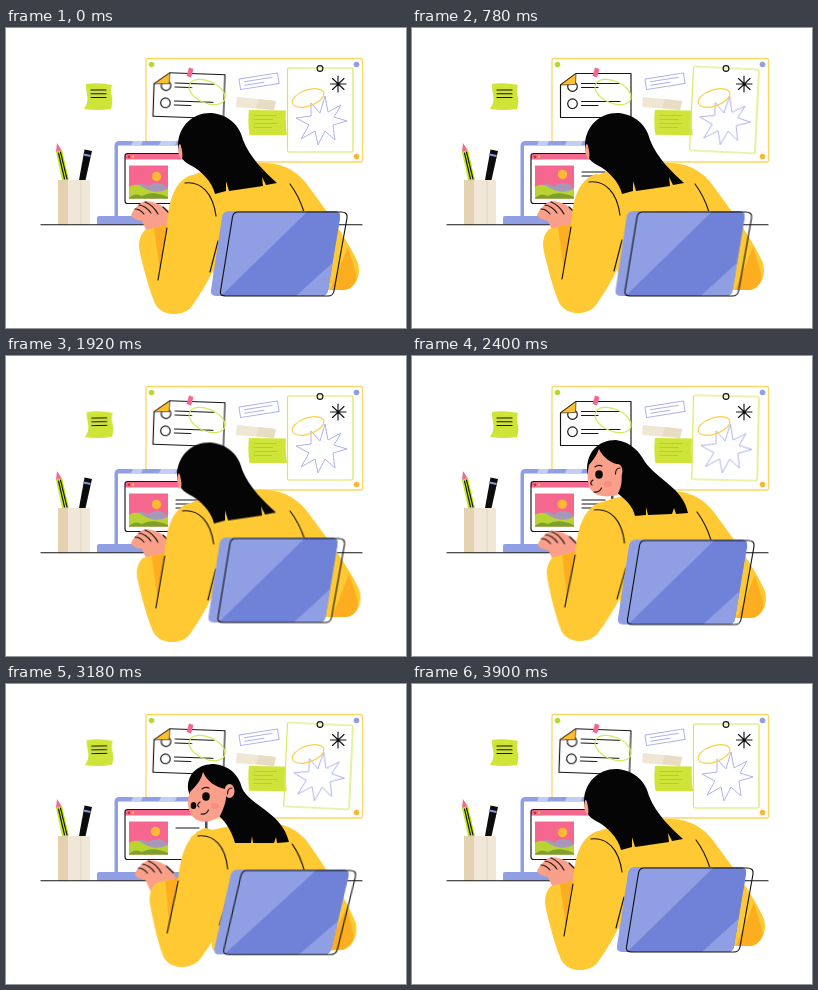
An HTML page for the animation above (3.93 s loop, 400 px wide and 300 px high).

```html
<!DOCTYPE html>
<html lang="en">
<head>
<meta charset="utf-8">
<title>Working at the desk</title>
<style>
html, body { margin: 0; width: 100%; height: 100%; overflow: hidden; background: #fff; }
svg { display: block; width: 400px; height: 300px; }
.ink { fill: none; stroke: #141414; stroke-width: 1.15; stroke-linecap: round; stroke-linejoin: round; }
.lilac { fill: none; stroke: #aeb2ea; stroke-width: 1; stroke-linejoin: round; }
.lime { fill: #cfe438; }
.blue { fill: #909fe4; }
.yellow { fill: #fec933; }
.amber { fill: #fcae20; }
.skin { fill: #fa9f8a; }
.pink { fill: #f5678e; }

.move { animation: 3930ms ease-in-out infinite; }

/* wall */
.note { transform-origin: 92px 56px; animation-name: note; }
@keyframes note { 0%, 20%, 61%, 100% { transform: none; } 34%, 49%, 81% { transform: translateX(.6px) rotate(-1deg); } }
.sheet { transform-origin: 314px 40px; animation-name: sheet; animation-duration: 1965ms; }
@keyframes sheet { 0%, 100% { transform: none; } 50% { transform: rotate(3deg); } }
.page { transform-origin: 184px 45px; animation-name: page; }
@keyframes page { 0%, 49%, 81%, 100% { transform: rotate(2deg); } 20%, 61% { transform: none; } 34% { transform: rotate(2.4deg); } }
.memo { transform-origin: 262px 82px; animation-name: memo; animation-duration: 1965ms; }
@keyframes memo { 0%, 100% { transform: none; } 60% { transform: rotate(.8deg); } }

/* screen */
.row { stroke-dasharray: 24; animation-timing-function: linear; }
.r1 { animation-name: r1; } .r2 { animation-name: r2; } .r3 { animation-name: r3; }
@keyframes r1 { 0%, 4% { stroke-dashoffset: 24.5; } 14%, 83% { stroke-dashoffset: 0; } 92%, 100% { stroke-dashoffset: 24.5; } }
@keyframes r2 { 0%, 14% { stroke-dashoffset: 24.5; } 23%, 72% { stroke-dashoffset: 0; } 79%, 100% { stroke-dashoffset: 24.5; } }
@keyframes r3 { 0%, 23% { stroke-dashoffset: 24.5; } 32%, 65% { stroke-dashoffset: 0; } 72%, 100% { stroke-dashoffset: 24.5; } }
.sun { animation-name: sun; }
@keyframes sun { 0%, 34%, 49%, 100% { transform: none; } 20% { transform: translateY(-2px); } 81% { transform: translate(-1px, -1px); } }

/* figure */
.hand { animation-name: tap; animation-duration: 393ms; }
@keyframes tap { 0%, 100% { transform: none; } 50% { transform: translateY(1.2px); } }
.wrist { animation-name: wrist; }
@keyframes wrist { 0%, 49%, 99% { transform: none; } 61% { transform: translate(.5px, 1.5px); } 72%, 83% { transform: translate(3.5px, 3px); } }
.arm { transform-origin: 0 283px; animation-name: arm; }
@keyframes arm {
  0%, 99.2%, 100% { transform: translate(0, 0) skewX(0deg); }
  20% { transform: translate(-2px, -1px) skewX(0deg); }
  33.6% { transform: translate(1px, -2px) skewX(-.3deg); }
  48.9% { transform: translate(-2px, 0) skewX(.2deg); }
  61% { transform: translate(0, -1px) skewX(-1.5deg); }
  71%, 83% { transform: translate(8px, -3px) skewX(-2.2deg); }
}
.torso { transform-origin: 0 268px; animation-name: torso; }
@keyframes torso {
  0%, 99.2%, 100% { transform: translate(0, 0) skewX(0deg); }
  20% { transform: translate(-1px, 0) skewX(0deg); }
  33.6% { transform: translate(-2px, 1px) skewX(-1deg); }
  48.9% { transform: translate(2px, -1px) skewX(1deg); }
  61% { transform: translate(1px, 0) skewX(0deg); }
  71%, 83% { transform: translate(-4px, 4px) skewX(-3.2deg); }
}
.chair { transform-origin: 0 268px; animation-name: chair; }
@keyframes chair {
  0%, 99.2%, 100% { transform: translate(0, 0) skewX(0deg); }
  20% { transform: translate(-1.5px, 0) skewX(0deg); }
  33.6% { transform: translate(-.3px, .5px) skewX(0deg); }
  48.9% { transform: translate(-2.5px, -1.5px) skewX(0deg); }
  61% { transform: translate(1px, .5px) skewX(0deg); }
  71%, 83% { transform: translate(3px, 2.5px) skewX(-4deg); }
}
.head { animation-name: bob; }
@keyframes bob {
  0%, 56%, 99.2%, 100% { transform: none; }
  20% { transform: translate(1px, 0); }
  33.6% { transform: translate(4px, -2.5px); }
  48.9% { transform: translate(-1px, 1.5px); }
}
.hair { animation-name: hair; }
@keyframes hair {
  0%, 54%, 97%, 100% { d: path("M172 116C173 97 188 84 206 85C223 87 234 98 237 112C244 130 259 144 271 155L260 157L256 149L257 158L223 163L220 153L220 163L209 166C206 154 195 142 184 137C176 133 172 126 172 116Z"); }
  61% { d: path("M175 114C175 96 186 84 204 84C220 86 228 97 233 106C246 124 271 132 276 157L264 158L262 152L260 158L236 159L234 151L234 159L223 160C221 150 213 143 205 137C190 133 176 128 175 114Z"); }
  71%, 85% { d: path("M182 105C181 88 194 80 208 80C225 82 233 92 236 104C244 122 276 128 283 158L271 159L270 153L268 159L247 159L246 152L245 159L229 159C226 148 220 138 213 132C199 130 185 121 182 105Z"); }
}
.face { animation-name: face; }
@keyframes face {
  0%, 54%, 97%, 100% { d: path("M173 117C172 120 172 126 174 129C175 131 176 132 176 131C177 127 176 122 175 118C175 117 174 116 174 116C174 116 173 116 173 117Z"); }
  61% { d: path("M177 109C175 118 175 128 179 134C186 142 198 141 205 139C211 130 211 118 207 109C200 107 191 102 187 93C185 99 181 104 177 109Z"); }
  71%, 85% { d: path("M184 108C181 116 181 126 187 133C193 140 205 139 214 132C219 122 222 112 219 105C209 103 201 97 197 88C195 97 189 103 184 108Z"); }
}
.ear { animation-name: ear; }
@keyframes ear {
  0%, 54%, 97%, 100% { transform: translate(-50px, 16px) scale(.1); }
  61% { transform: translate(-18px, 8px); }
  71%, 85% { transform: none; }
}
.look { animation-name: look; }
@keyframes look {
  0%, 57%, 94%, 100% { transform: translate(-22px, 8px); opacity: 0; }
  59%, 91% { opacity: 1; }
  61% { transform: translate(-13px, 6px); }
  71%, 85% { transform: none; }
}
.far { animation-name: far; }
@keyframes far { 0%, 63%, 89%, 100% { opacity: 0; } 67%, 86% { opacity: 1; } }
</style>
</head>
<body>
<svg viewBox="0 0 400 300" aria-label="A woman typing at a laptop">
  <defs>
    <clipPath id="picture"><rect x="123" y="137.500" width="39" height="33"/></clipPath>
    <clipPath id="seat"><path d="M223 183H328Q335 183 334 190L322 262Q321 268 315 268H211Q204 268 205 262L216 189Q217 183 223 183Z"/></clipPath>
  </defs>

  <!-- sticky note -->
  <g class="move note">
    <path class="lime" d="M80 56Q92 54 106 57Q104 63 106 69Q107 75 105 81Q92 83 78 81Q83 74 81 67Q80 61 80 56Z"/>
    <path class="ink" d="M85 62H100M85 65.700H100M85 69.500H100"/>
  </g>

  <!-- board -->
  <rect x="140" y="30.500" width="216.500" height="103.500" rx="2" fill="#fff" stroke="#fbd866" stroke-width="1.300"/>
  <circle cx="145.500" cy="36.500" r="2.800" fill="#b7d936"/>
  <circle cx="350.500" cy="36.500" r="2.800" class="blue"/>
  <circle cx="350.500" cy="128.500" r="2.800" fill="#fdb62d"/>

  <g class="move page">
    <path class="ink" d="M164 45.500H219V89.500H148.500V57Z"/>
    <g class="ink">
      <circle cx="160.500" cy="58.500" r="4.800"/><circle cx="160.500" cy="75.700" r="4.800"/>
      <path d="M169.500 55.500H208M169.500 59.500H186M169.500 73.500H208M169.500 77.500H186"/>
    </g>
    <path d="M164 45.500L163.500 56.500L148.500 57Z" fill="#fdc02c" stroke="#141414" stroke-width=".6"/>
  </g>
  <path class="pink" d="M183 39.500L187.500 41L185 49.500L180.500 48Z"/>
  <ellipse cx="201" cy="64" rx="19" ry="11" transform="rotate(24 201 64)" fill="none" stroke="#d5e85c" stroke-width="1.200"/>

  <g transform="rotate(-9 253 53)">
    <rect class="lilac" x="233.500" y="48" width="39" height="10.500"/>
    <path class="lilac" d="M238 51.500H267M238 55H258"/>
  </g>
  <path d="M231 69L270 73L268 82L230 79Z" fill="#f0e6d4"/>
  <path d="M253 71L270 73L268 82L250 80Z" fill="#e9dcc4"/>
  <g class="move memo">
    <path class="lime" d="M243 82L280 82.500Q279 95 281 107H243.500Q241.500 94 243 82Z"/>
    <path d="M247.500 87.500H271M247.500 91.500H267M247.500 95.500H271M247.500 99.500H266" stroke="#b3b59a" stroke-width=".9" fill="none"/>
  </g>

  <g class="move sheet">
    <rect x="281.500" y="40" width="65.500" height="84" rx="1.500" fill="none" stroke="#d5e85c" stroke-width="1.200"/>
    <path class="lilac" d="M319 68L322 84L335 77L328 89L341 93L327 97L329 112L319 103L312 117L309 103L295 111L303 97L290 90L305 88L305 75L314 85Z"/>
  </g>
  <circle class="ink" cx="314" cy="40.500" r="2.900"/>
  <path class="ink" d="M332 48V64M324.500 56H340M326.500 50.500L338 61.500M338 50.500L326.500 61.500"/>
  <ellipse cx="302" cy="70" rx="16.500" ry="8" transform="rotate(-19 302 70)" fill="none" stroke="#fbd04c" stroke-width="1.200"/>

  <!-- pencil cup -->
  <path d="M50 124L56 121.500L63 152H56Z" fill="#c6e61c"/>
  <path class="pink" d="M51 115L55.500 122L50 124Z"/>
  <path class="ink" d="M52.500 125L58.500 151M54.500 124L61 151" stroke-width=".7"/>
  <path d="M78.500 121.500L86 123L79.500 152H73Z" fill="#0c0c0c"/>
  <path d="M77.500 126.500L84.500 128" stroke="#8a94dc" stroke-width="2"/>
  <path d="M52 152H84V197H52Z" fill="#f0e7d8"/>
  <path d="M52 152H62V197H52Z" fill="#e5d2b0"/>
  <path d="M75 152V197" stroke="#e5d7bd"/>

  <!-- laptop -->
  <path class="blue" d="M108.500 190V118Q108.500 113 113.500 113H197Q202 113 202 118V190Z"/>
  <path d="M127 113H137L135 117H125ZM155 113H171L169 117H153Z" fill="#c4cdf4"/>
  <path d="M112 117.500H199V188H112Z" fill="#fff"/>
  <path class="pink" d="M119 131.500V128Q119 125.500 121.500 125.500H200V131.500Z"/>
  <rect class="ink" x="119" y="125.500" width="81" height="50" rx="2.500"/>
  <circle cx="123" cy="128.700" r="1.300" fill="#d7263d"/>
  <circle cx="127" cy="128.700" r="1.300" fill="#fec933"/>
  <g clip-path="url(#picture)">
    <rect class="pink" x="123" y="137" width="39" height="34"/>
    <circle class="move sun" cx="150.500" cy="148.500" r="4.700" fill="#fdb935"/>
    <path d="M123 161Q134 153 142 158Q153 151 162 160V171H123Z" fill="#a698b8"/>
    <path d="M123 159Q130 154 138 160Q150 167 162 161V171H123Z" fill="#b9d432"/>
    <path d="M123 170Q129 164 136 168Q146 162 162 169V171H123Z" fill="#7f9f2f"/>
  </g>
  <path class="ink move row r1" d="M170 144H193"/>
  <path class="ink move row r2" d="M170 148H193"/>
  <path class="ink move row r3" d="M170 152H188"/>
  <path class="blue" d="M93 188H202V196.500H91V190Q91 188 93 188Z"/>
  <path d="M35 196.700H356" class="ink"/>

  <!-- far side of the body -->
  <g class="move torso">
    <path class="yellow" d="M182 149C205 139 238 134 260 135C281 136 294 146 303 159C319 181 341 210 352 235C356 251 347 262 336 262H210L200 205Z"/>
    <path class="amber" d="M342 219L324 262H337C346 262 352 254 350 246Z"/>
    <path class="ink" d="M284 156Q293 168 298 184"/>
  </g>

  <!-- near arm -->
  <g class="move wrist"><g class="move hand">
    <path class="skin" d="M125 187C128 181 133 175 139 173C148 173 159 178 165 185L166 199L142 206L136 193C132 192 127 191 125 187Z"/>
    <path class="ink" d="M129 181Q134 181 138 186M133 177Q140 178 145 185M139 174Q147 177 152 186M157 179L164 186"/>
  </g></g>
  <g class="move arm">
    <path class="yellow" d="M186 147C170 152 163 169 161 197L139 202C133 208 132 217 134 225C138 242 143 261 148 273C153 289 177 290 186 278C195 265 202 253 208 241L222 190L220 155Z"/>
    <path class="amber" d="M148 200L161 197L154 244Z"/>
    <path class="ink" d="M161 200L152 252M179 155C195 153 207 165 210 188M212 213L204 244"/>
  </g>

  <!-- head -->
  <g class="move head">
    <path class="move hair" fill="#050505" d="M172 116C173 97 188 84 206 85C223 87 234 98 237 112C244 130 259 144 271 155L260 157L256 149L257 158L223 163L220 153L220 163L209 166C206 154 195 142 184 137C176 133 172 126 172 116Z"/>
    <path class="move face skin" d="M173 117C172 120 172 126 174 129C175 131 176 132 176 131C177 127 176 122 175 118C175 117 174 116 174 116C174 116 173 116 173 117Z"/>
    <g class="move ear">
      <ellipse class="skin" cx="223.500" cy="107" rx="5" ry="7"/>
      <path class="ink" d="M221.500 110Q221.500 104 226 104" stroke-width=".8"/>
    </g>
    <g class="move look">
      <ellipse cx="209" cy="122" rx="4" ry="3" fill="#f98d84"/>
      <ellipse cx="200" cy="112.500" rx="3.800" ry="4.200" fill="#0c0c0c"/>
      <ellipse class="move far" cx="187.500" cy="121.500" rx="2.800" ry="3.600" fill="#0c0c0c"/>
      <path class="ink" d="M194 118Q190 121 193 123M195 130Q200 131 202.500 126M196 105Q199 102.500 203 104" stroke-width="1"/>
    </g>
  </g>

  <!-- chair -->
  <g class="move chair">
    <g clip-path="url(#seat)">
      <rect class="blue" x="200" y="180" width="140" height="92"/>
      <path d="M302 183H340L326 268H215Z" fill="#6f82d8"/>
      <path class="blue" d="M290 268L334 228V268Z"/>
    </g>
    <path class="ink" d="M232 184H335Q342 184 341 190L328 263Q327 268 322 268H219.500Q213.500 268 214.500 263L226.500 189Q227.500 184 232 184Z"/>
  </g>
</svg>
</body>
</html>
```
